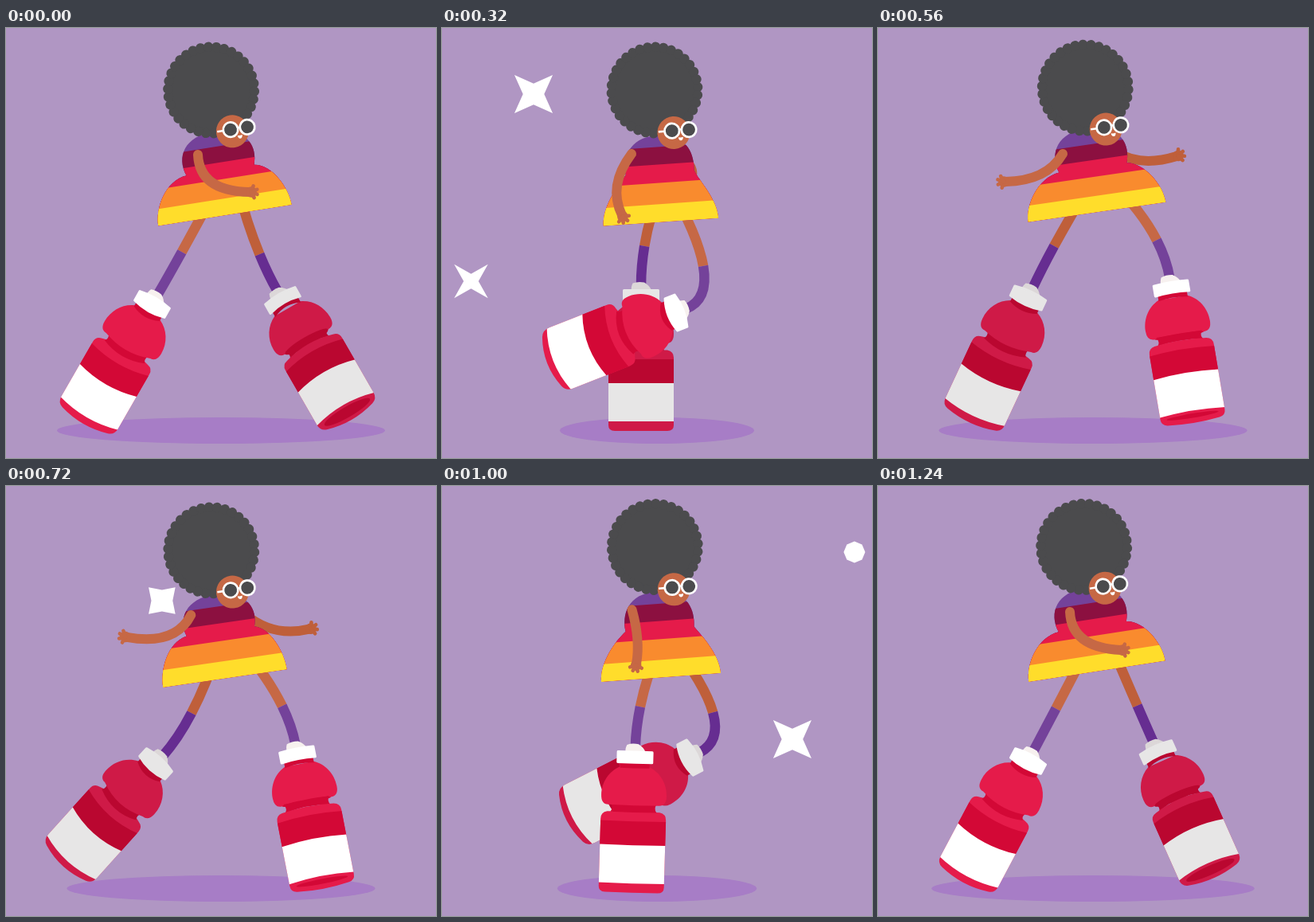
Recreate the animation shown at these times as an HTML page with a canvas. Size 540 px wide and 540 px high, loop 1.28 s.

```html
<!DOCTYPE html>
<html lang="en">
<head>
<meta charset="utf-8">
<title>Bottle walk</title>
<style>
html, body { margin: 0; height: 100%; overflow: hidden; background: #b096c3; }
canvas { display: block; width: 540px; height: 540px; }
</style>
</head>
<body>
<canvas id="stage" width="540" height="540"></canvas>
<script>
const ctx = document.getElementById('stage').getContext('2d');
const LOOP = 1280, STEP = 40, RAD = Math.PI / 180;

const NEAR = { skin: '#c66845', sock: '#74429a', red: '#e51b4a', dark: '#d30836', label: '#fff', cap: '#fff', spout: '#f7f1ef' };
const FAR = { skin: '#bf5f3a', sock: '#662d91', red: '#cf1a47', dark: '#ba0730', label: '#e7e6e6', cap: '#e7e6e6', spout: '#dcd7d8' };
const BANDS = [['#74429a', 130], ['#8c1040', 96], ['#e51b4a', 73.5], ['#f98b2e', 50], ['#ffdd2b', 23]];

// time, cap x, cap y, bottle angle
const STRIDE = [
  [0, 175.5, 342, 30], [160, 212, 356, 55], [240, 244, 362, 68.5], [320, 286, 352.5, 68.5],
  [440, 356, 322, 36], [560, 360.5, 322, -9.5], [600, 351.5, 334.5, -24], [640, 347.5, 342, -30],
  [720, 358, 332.5, -11], [800, 342.5, 336, 0], [880, 296, 335, 0], [960, 250, 336, 0],
  [1080, 210.5, 335, 10], [1200, 188.5, 339, 25], [1240, 180.5, 340.5, 28]
];
// time, shoulder, control, hand
const NEAR_ARM = [
  [0, 241, 159, 243, 205, 306, 206], [160, 241, 163, 243, 209, 293, 226], [320, 238, 158, 208, 198, 226, 235],
  [560, 232, 158, 212, 192, 160, 193], [680, 232, 162, 212, 197, 150, 186], [880, 236, 161, 223, 216, 187, 223],
  [1080, 240, 153, 260, 182, 280, 223], [1240, 241, 158, 243, 203, 305, 206]
];
const FAR_ARM = [
  [0, 290, 160, 280, 180, 270, 195], [160, 290, 162, 290, 185, 280, 203], [320, 295, 157, 331, 182, 300, 203],
  [560, 300, 156, 330, 175, 375, 161], [680, 300, 158, 335, 186, 382, 172], [880, 300, 172, 330, 206, 356, 209],
  [1080, 290, 160, 296, 182, 282, 200]
];
// birth, x at time zero, y
const STARS = [[40, 404, 144], [120, 129, 318], [200, 207.5, 83], [640, 404, 144], [880, 729, 318], [960, 807, 83]];
// age, point radius, notch radius
const TWINKLE = [[0, 0, 0], [40, 13.5, 13.5], [120, 34, 13.3], [200, 30, 9.3], [240, 15, 4.6], [280, 0, 0]];

// Looping smooth interpolation that never overshoots at turning points
function track(rows, t) {
  const n = rows.length;
  const at = (i, k) => rows[(i + n) % n][k] + (k ? 0 : Math.floor(i / n) * LOOP);
  let i = n - 1;
  while (rows[i][0] > t) i--;
  const t0 = at(i, 0), d = at(i + 1, 0) - t0, u = (t - t0) / d;
  const slope = (j, k) => {
    const a = at(j, k) - at(j - 1, k), b = at(j + 1, k) - at(j, k);
    return a * b <= 0 ? 0 : (a + b) / (at(j + 1, 0) - at(j - 1, 0));
  };
  return rows[i].slice(1).map((p, j) => {
    const k = j + 1, q = at(i + 1, k), v = 1 - u;
    return p * (1 + 2 * u) * v * v + q * u * u * (3 - 2 * u)
      + d * u * v * (slope(i, k) * v - slope(i + 1, k) * u);
  });
}

function fill(color, path) {
  ctx.fillStyle = color;
  ctx.fill(new Path2D(path));
}
function line(color, width, path) {
  ctx.strokeStyle = color;
  ctx.lineWidth = width;
  ctx.stroke(new Path2D(path));
}
function oval(color, x, y, rx, ry = rx) {
  ctx.fillStyle = color;
  ctx.beginPath();
  ctx.ellipse(x, y, rx, ry, 0, 0, 7);
  ctx.fill();
}
function placed(x, y, deg, draw) {
  ctx.save();
  ctx.translate(x, y);
  ctx.rotate(deg * RAD);
  draw();
  ctx.restore();
}

function star(t, [birth, x0, y]) {
  const age = t - birth;
  if (age <= 0 || age >= 280) return;
  const i = TWINKLE.findIndex(r => r[0] > age);
  const a = TWINKLE[i - 1], b = TWINKLE[i], u = (age - a[0]) / (b[0] - a[0]);
  const x = x0 - t * 370 / LOOP;
  ctx.fillStyle = '#fff';
  ctx.beginPath();
  for (let k = 0; k < 8; k++) {
    const j = k % 2 ? 1 : 2, r = a[j] + (b[j] - a[j]) * u;
    ctx.lineTo(x + r * Math.cos(k * 45 * RAD), y + r * Math.sin(k * 45 * RAD));
  }
  ctx.fill();
}

function bottle(c, bow) {
  const k = Math.abs(bow);
  const body = () => {
    const p = `M-41 78Q-41 70 -33 68.5Q0 ${68.5 - 1.6 * k} 33 68.5Q41 70 41 78V${163 - k}` +
      `Q41 ${170 - .7 * k} 33 ${170 - .3 * k}Q0 ${170 + 1.3 * k} -33 ${170 - .3 * k}Q-41 ${170 - .7 * k} -41 ${163 - k}Z`;
    fill(c.red, p);
    ctx.save();
    ctx.clip(new Path2D(p));
    const band = (color, a, b) =>
      fill(color, `M-42 ${a}Q0 ${a + 2 * bow} 42 ${a}V${b}Q0 ${b + 2 * bow} -42 ${b}Z`);
    band(c.dark, 80, 110);
    band(c.label, 110, 158);
    ctx.restore();
    if (bow < -1) oval(c.dark, 0, 162, 33, k * 1.1);
  };
  const waist = () => fill(c.dark, `M-29 58Q-25 64.5 -29 69Q0 ${69 + 2 * bow} 29 69Q25 64.5 29 58Z`);

  if (bow >= 0) { body(); waist(); }
  fill(c.red, `M-18.5 12C-32 18 -41 32 -41 48Q-41 60 -32 60Q0 ${60 + 2 * k} 32 60Q41 60 41 48C41 32 32 18 18.5 12Z`);
  if (bow < 0) {
    oval(c.dark, 0, 60, 31, k);
    waist();
    body();
  }
  fill(c.dark, `M-18.5 0H18.5V13.5Q0 ${13.5 + 1.5 * bow} -18.5 13.5Z`);
  fill(c.spout, 'M-12 -7Q-13 -10 -10.5 -15.5Q-4 -18 4 -16.5Q10 -13 13 -7Z');
  const cap = `M-21.5 -6.5Q0 ${-6.5 - .8 * k} 21.5 -6.5V6.5Q0 ${6.5 + bow} -21.5 6.5Z`;
  fill(c.cap, cap);
  line(c.cap, 3, cap);
}

function leg(t, c, dx, dy, bob) {
  const [px, py, a] = track(STRIDE, t);
  const x = px + dx, y = py + dy, sx = Math.sin(a * RAD), sy = -Math.cos(a * RAD);
  const foot = [x + 13 * sx, y + 13 * sy];
  const knee = [foot[0] + 60 * sx, foot[1] + 60 * sy];
  const hip = [280 + .15 * (foot[0] - 275), 196 + bob];
  const mix = (p, q, u) => [p[0] + (q[0] - p[0]) * u, p[1] + (q[1] - p[1]) * u];
  const u = .6 - .0018 * Math.max(a, 0);
  const p = mix(hip, knee, u), q = mix(knee, foot, u), m = mix(p, q, u);
  line(c.skin, 12.5, `M${hip}Q${p} ${m}`);
  line(c.sock, 12.5, `M${m}Q${q} ${foot}`);
  placed(x, y, a, () => bottle(c, 8 * Math.tanh(a / 30)));
}

function arm(rows, t, skin) {
  const [x, y, cx, cy, hx, hy] = track(rows, t);
  ctx.lineCap = 'round';
  line(skin, 12, `M${x} ${y}Q${cx} ${cy} ${hx} ${hy}`);
  placed(hx, hy, Math.atan2(hy - cy, hx - cx) / RAD, () => {
    oval(skin, 2, 0, 6.8);
    for (const f of [-72, -25, 20, 62])
      line(skin, 4.6, `M2 0L${2 + 8 * Math.cos(f * RAD)} ${8 * Math.sin(f * RAD)}`);
  });
  ctx.lineCap = 'butt';
}

function dress(th, y, tilt) {
  const flare = Math.cos(th - 315 * RAD);
  const w = (157 + 17.5 * flare) / 2, s = .945 - .055 * flare;
  const puff = Math.pow(.5 + .5 * Math.cos(th - 345 * RAD), .6);
  const mid = 3, top = -109 + 3 * puff;
  const side = g => ({
    hem: `${g * w} 0`, low: `${g * w} ${-25 * s}`,
    out: `${g * (50 + 18 * puff)} ${-48 * s - 11 * puff}`,
    pinch: `${mid + g * 43} ${-63 * s}`,
    chest: `${mid + g * (44 + 8 * puff)} -82`, neck: `${mid + g * 38} ${top}`
  });
  const l = side(-1), r = side(1);
  placed(275, y, tilt, () => {
    ctx.clip(new Path2D(`M${l.hem}C${l.low} ${l.out} ${l.pinch}C${l.chest} ${l.neck} ${mid} ${top}` +
      `C${r.neck} ${r.chest} ${r.pinch}C${r.out} ${r.low} ${r.hem}Z`));
    for (const [color, h] of BANDS) {
      ctx.fillStyle = color;
      ctx.fillRect(-110, -h * s, 220, h * s);
    }
  });
}

function head(th, tilt) {
  const sway = Math.cos(th - 20 * RAD), bob = Math.sin(th);
  placed(262.3 - 5 * sway, 78 + 4.1 * bob, tilt, () => {
    oval('#4b4b4d', 0, 0, 56);
    for (let i = 0; i < 34; i++) {
      const a = i / 17 * Math.PI;
      oval('#4b4b4d', 54.3 * Math.cos(a), 54.3 * Math.sin(a), 6.2);
    }
  });
  placed(285.4 - 3.6 * sway, 128.4 + 4.3 * Math.sin(th - 10 * RAD), tilt, () => {
    oval(NEAR.skin, 2, 2.5, 20.5);
    line('#fff', 2.6, 'M-17 0H-9M9 -1H13');
    for (const x of [0, 21.3]) {
      oval('#fff', x, 0, 10.6);
      oval('#4b4b4d', x, 0, 7.9);
    }
    fill('#fff', 'M7.5 8.6Q10.5 9.6 13.5 8.6Q13.2 12.8 10.5 12.8Q7.8 12.8 7.5 8.6Z');
  });
}

function draw(t) {
  const th = t / 640 * 2 * Math.PI;
  const tilt = -6.5 - 2.5 * Math.cos(th);
  const hem = 239.5 + 8.5 * Math.cos(th - 120 * RAD);
  const bob = 4 * Math.sin(th);
  ctx.fillStyle = '#b096c3';
  ctx.fillRect(0, 0, 540, 540);
  oval('#a77dc6', 270, 505.5, 164 + 42 * Math.cos(th), 16.5);
  STARS.forEach(s => star(t, s));
  arm(FAR_ARM, t, FAR.skin);
  leg((t + 640) % LOOP, FAR, 0, 0, bob);
  leg(t, NEAR, 8, 5, bob);
  dress(th, hem, tilt);
  head(th, tilt);
  arm(NEAR_ARM, t, NEAR.skin);
}

ctx.lineJoin = 'round';
const start = performance.now();
function tick() {
  const t = (performance.now() - start) % LOOP;
  draw(Math.floor(t / STEP) * STEP);
  requestAnimationFrame(tick);
}
tick();
</script>
</body>
</html>
```
